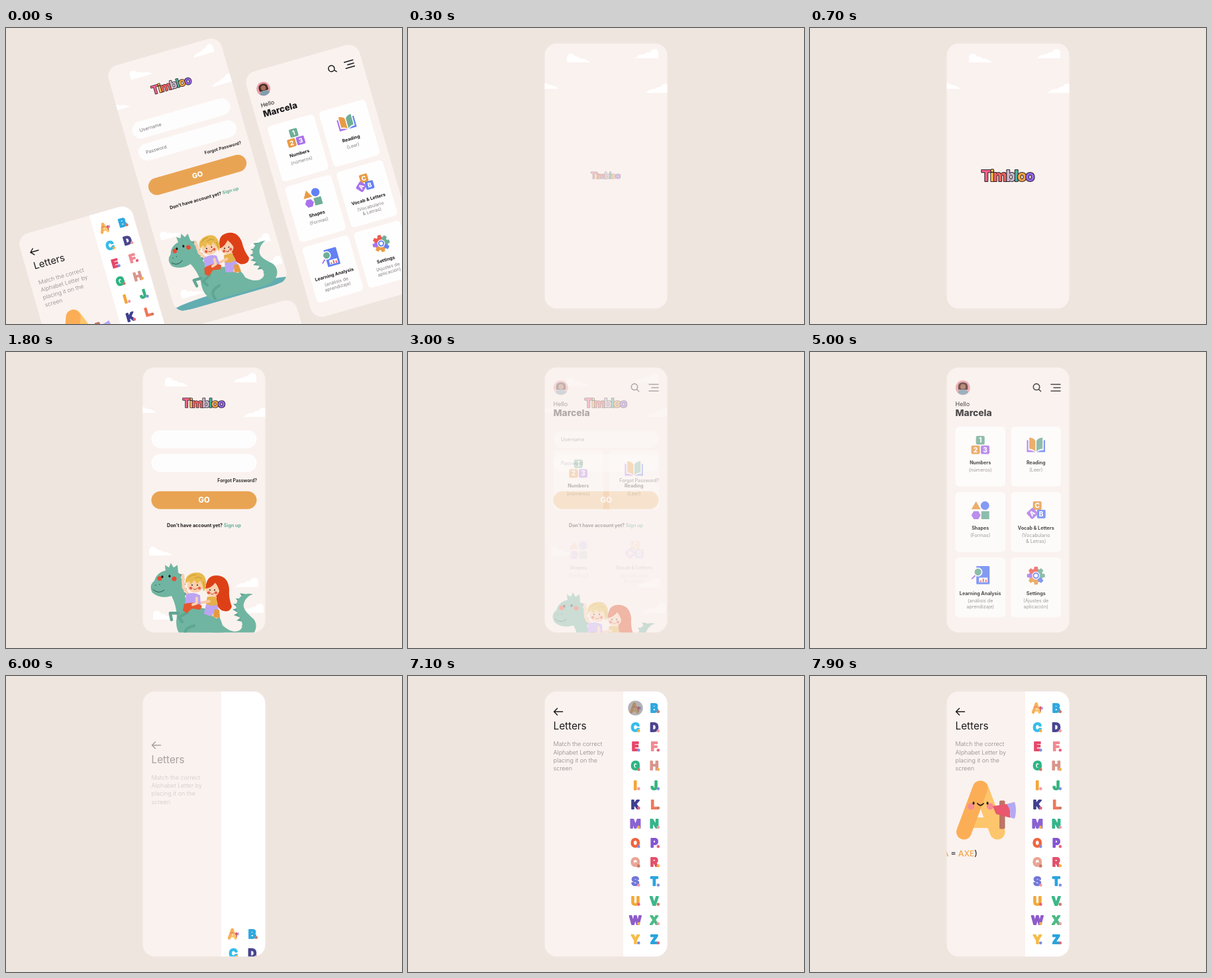
An HTML page for the animation above (8 s loop, 598 by 448 pixels).

```html
<!DOCTYPE html>
<html lang="en">
<head>
<meta charset="utf-8">
<title>Kids learning app</title>
<style>
html, body { margin: 0; width: 100%; height: 100%; overflow: hidden; background: #efe5df; }
svg { display: block; width: 100vw; height: 100vh; font-family: Inter, "Open Sans", sans-serif; fill: #1d1a1c; }
.mid { text-anchor: middle; }
.bold { font-size: 7.15px; font-weight: 700; }
.hint { font-size: 7.3px; fill: #77727a; }
.sub { font-size: 7.2px; fill: #858085; text-anchor: middle; }
.plate { fill: #faf2ef; }
.line { fill: none; stroke-linecap: round; stroke-linejoin: round; }
</style>
</head>
<body>
<svg viewBox="0 0 598 448" preserveAspectRatio="none">
  <defs>
    <rect id="phone" x="206.5" y="23.5" width="185" height="401" rx="18"/>
    <clipPath id="frame"><use href="#phone"/></clipPath>
    <path id="cloud" fill="#fff" d="M0 13V5Q1-1 7 0Q11 1 13 5Q17 3 20 7Q29 7 35 13Z"/>
    <g id="axeLetter" transform="translate(-265.5 -202.5)">
      <g class="line" stroke-width="23">
        <path stroke="#fdc66c" d="M258 170L283 236"/>
        <path stroke="#fdc66c" stroke-width="16" d="M246 222H270"/>
        <path stroke="#fcae56" d="M257 170L232.5 236"/>
      </g>
      <g fill="#f78b95"><circle cx="243" cy="197.5" r="5"/><circle cx="272" cy="197.5" r="5"/></g>
      <ellipse cx="247" cy="192.5" rx="1.5" ry="2.3"/><ellipse cx="268" cy="192.5" rx="1.5" ry="2.3"/>
      <path class="line" stroke="#1d1a1c" stroke-width="1.8" d="M253 193Q257.5 198.5 262 193"/>
      <rect x="286" y="188.5" width="8.5" height="43" rx="2" fill="#bd7465"/>
      <path fill="#e9586e" d="M276 197L302 193V214.5L281 209Z"/>
      <path fill="#b5a8f2" d="M297 194L309 190.5Q313 203 309 216L302 214Q304 203 297 194Z"/>
    </g>
  </defs>
  <rect width="598" height="448" fill="#efe5df"/>
  <use id="base" class="plate" href="#phone"/>
  <use id="below" class="plate" href="#phone"/>

  <g id="login" clip-path="url(#frame)">
    <use class="plate" href="#phone"/>
    <g id="sky">
      <use href="#cloud" x="240" y="39"/><use href="#cloud" x="192" y="79"/>
      <use href="#cloud" transform="translate(378 32) scale(-1 1.05)"/><use href="#cloud" transform="translate(394 84.5) scale(-1 1.05)"/>
    </g>
    <g id="lowClouds">
      <use href="#cloud" x="216" y="295"/><use href="#cloud" x="222" y="392"/>
      <use href="#cloud" transform="translate(381 342) scale(-1 1.05)"/><use href="#cloud" transform="translate(389 381) scale(-1 1.05)"/>
    </g>
    <g id="logo"><text id="logoText" class="mid" y="8.5" font-size="23" font-weight="800" letter-spacing="-2" stroke="#2b2027" stroke-width="2" stroke-linejoin="round" paint-order="stroke"></text></g>
    <g id="form">
      <g fill="#fefdfd"><rect x="219.5" y="118.5" width="159" height="27" rx="13.5"/><rect x="219.5" y="154.5" width="159" height="27" rx="13.5"/></g>
      <text class="bold" x="379" y="196.7" text-anchor="end" style="font-weight:600;font-size:6.9px">Forgot Password?</text>
      <rect x="219.5" y="210.8" width="159" height="27" rx="13.5" fill="#e9a453"/>
      <text class="mid" x="299" y="228.3" font-size="11.3" font-weight="800" fill="#fff">GO</text>
      <text class="bold mid" x="299" y="264.7">Don’t have account yet? <tspan fill="#62b19b">Sign up</tspan></text>
    </g>
    <text id="user" class="hint" x="231" y="134.7">Username</text>
    <text id="pass" class="hint" x="231" y="170.7">Password</text>
    <g id="ride">
      <ellipse cx="298" cy="432" rx="95" ry="8" fill="#62adb2"/>
      <g id="spikes" fill="#5fa693"></g>
      <g fill="#70b5a1">
        <path d="M373 366C355 362 342 378 350 396C354 406 361 412 354 420C346 426 334 422 322 408L306 434H350C378 434 382 414 374 404C366 396 355 388 360 378Q363 370 373 366Z"/>
        <path d="M241 332L240 322L246 326L249 319L253 326L259 322L260 333Z"/>
        <path d="M244 330Q258 325 264 340Q267 358 271 372Q280 386 312 390Q330 402 328 434H268Q254 420 258 400Q257 382 250 369Q232 374 221 364Q215 353 224 346Q228 332 244 330Z"/>
      </g>
      <path class="line" stroke="#5fa693" stroke-width="4.5" d="M260 395L248 395L250 405M274 394L261 401L266 408M272 432Q266 418 284 414"/>
      <g fill="#e94a34"><circle cx="232" cy="342.5" r="3.5"/><circle cx="254" cy="343" r="3.5"/></g>
      <ellipse class="eye" cx="236" cy="340" rx="1.6" ry="2"/><ellipse class="eye" cx="247" cy="339" rx="1.6" ry="2"/>
      <path class="line" stroke="#2f5a50" d="M222 359Q230 367 239 360M226 352v1M232 351v1"/>
      <g id="girl">
        <path fill="#dd4017" d="M302 357Q302 337 319 338Q335 339 337 358Q336 372 341 385Q338 395 326 391Q315 384 318 370Z"/>
        <path fill="#bda4f3" d="M303 378L318 378L323 398Q311 402 299 396Z"/>
        <path fill="#e5b04a" d="M304 370H317L320 382Q311 386 302 381Z"/>
        <path class="line" stroke="#f9c9a6" stroke-width="4" d="M307 377L291 380M313 398L318 401"/>
        <ellipse cx="312" cy="359" rx="10.5" ry="11" fill="#fbd0ae"/>
        <path fill="#dd4017" d="M301 358Q302 342 315 342Q325 346 323 365Q321 355 316 349Q310 357 301 358Z"/>
        <path fill="#e79a3e" d="M315 389L322 390L323 402L313 401Z"/>
      </g>
      <g id="boy">
        <path class="line" stroke="#fbd0ae" stroke-width="4.5" d="M276 368L268 356L267 338"/>
        <path fill="#bda4f3" d="M272 366Q284 362 293 368L294 384H270Z"/>
        <path fill="#e4572e" d="M269 381Q285 376 296 384L293 390L281 388L273 395L267 391Z"/>
        <ellipse cx="286" cy="352" rx="12.5" ry="11.5" fill="#fbd0ae"/>
        <path fill="#e8ba4d" d="M271 350Q270 337 283 334Q300 331 302 347Q303 358 298 362Q297 351 293 346L289 351L284 345L279 352L277 346Z"/>
        <path class="line" stroke="#c8952f" d="M276 341Q281 336 287 337M285 342Q291 338 296 343M298 347Q300 352 299 356"/>
        <path class="line" stroke="#fbd0ae" stroke-width="4" d="M288 372L288 380L282 382"/>
      </g>
      <g fill="#ea5b45"><circle cx="279" cy="357" r="2.2"/><circle cx="292" cy="357" r="2.2"/><circle cx="306" cy="364" r="2.2"/><circle cx="317" cy="364" r="2.2"/></g>
      <g><circle cx="281" cy="352.5" r="1"/><circle cx="289" cy="352.5" r="1"/><circle cx="308" cy="360" r="1"/><circle cx="315" cy="360" r="1"/></g>
      <path class="line" stroke="#b5422f" d="M283 358Q286 361 289 357M309 365Q312 368 314 365"/>
    </g>
  </g>

  <g id="home" clip-path="url(#frame)">
    <use class="plate" href="#phone"/>
    <g id="header">
      <circle cx="230.8" cy="54" r="11" fill="#e9a0a6"/>
      <path fill="#4a2c2a" d="M224 57Q222 46 231 46Q240 46 238 57Z"/>
      <circle cx="231" cy="52.5" r="4" fill="#a96e58"/>
      <path fill="#7f9fb0" d="M223 61.5Q224 57 231 57Q238 57 239 61.5Q231 68 223 61.5Z"/>
      <path class="line" stroke="#1d1a1c" stroke-width="1.6" d="M345.5 56.5L348.5 59.5M364 49H378M368 54H378M364 59H378"/>
      <circle cx="342" cy="52.8" r="4.7" fill="none" stroke="#1d1a1c" stroke-width="1.6"/>
      <text x="219.5" y="81.5" font-size="9">Hello</text>
      <text x="219.5" y="97.3" font-size="13.8" font-weight="800">Marcela</text>
    </g>
    <g id="tiles"></g>
    <circle id="tap" r="11" fill="#8b8688"/>
  </g>

  <g id="letters" clip-path="url(#frame)">
    <use class="plate" href="#phone"/>
    <rect id="panel" x="325" y="23" width="67" height="402" fill="#fff"/>
    <g id="intro">
      <path class="line" stroke="#1d1a1c" stroke-width="1.5" d="M233.5 54H220.5M225.5 49L220.5 54L225.5 59"/>
      <text x="219.5" y="81.3" font-size="15.3">Letters</text>
      <g id="brief" font-size="9" font-weight="300" fill="#8d8688"></g>
    </g>
    <g id="alphabet" class="mid"></g>
    <circle id="press" cx="343.5" cy="48.5" r="11.3" fill="#77737a"/>
    <use id="bigA" href="#axeLetter"/>
    <text id="answer" class="mid" y="272.6" font-size="12" font-weight="600" fill="#444">(<tspan fill="#f0ae5c">A</tspan> = <tspan fill="#f0ae5c">AXE</tspan>)</text>
  </g>
</svg>
<script>
const $ = id => document.getElementById(id);
const [green, orange, purple, blue, red] = ["#6fae97", "#e89b45", "#a873ec", "#6281f5", "#ec5b52"];

const clamp = v => Math.min(1, Math.max(0, v));
const span = (t, a, b) => clamp((t - a) / (b - a));
const easeOut = p => 1 - (1 - p) ** 2;
const easeBoth = p => p < .5 ? 2 * p * p : 1 - 2 * (1 - p) ** 2;
const mix = (a, b, p) => a + (b - a) * p;
const show = (id, alpha) => {
  $(id).setAttribute("opacity", alpha);
  $(id).style.display = alpha > 0 ? "" : "none";
};
const move = (id, x, y, scale = 1) =>
  $(id).setAttribute("transform", `translate(${x} ${y}) scale(${scale})`);

// Logo
const logoColors = ["#f4628a", "#f6c04c", "#ee6260", "#c9b8cd", "#45b59b", "#f2a445", "#9566e6"];
$("logoText").innerHTML = [..."Timbloo"].map((c, i) => `<tspan fill="${logoColors[i]}">${c}</tspan>`).join("");

// Spikes along neck and tail
const spike = (x, y, angle) => `<path transform="translate(${x} ${y}) rotate(${angle})" d="M-4 3L0-6L4 3Z"/>`;
let spikes = "";
for (let i = 0; i < 5; i++) spikes += spike(263 + i * 1.6, 338 + i * 7, 78);
for (let s = 0; s <= 1; s += .16) spikes += spike(348 + 50 * (s - .45) ** 2, 368 + s * 46, -55 - 60 * s);
$("spikes").innerHTML = spikes;

// Home tiles; icons are centred on their own origin
const block = (x, y, color, char, turn = 0) =>
  `<g transform="translate(${x} ${y}) rotate(${turn})"><rect x="-6.5" y="-6.5" width="13" height="13" rx="2" fill="${color}"/>
   <text class="mid" y="3.6" font-size="10" font-weight="800" fill="#fff">${char}</text></g>`;
const page = (flip, color, edge) =>
  `<g transform="scale(${flip} 1)"><path fill="${edge}" d="M11.6-7H13.8V11H1.5Q5 8 11.6 8Z"/>
   <path fill="${color}" d="M.8-6Q3-10.5 10-11V6Q4 6 .8 10.5Z"/></g>`;
const gear = () => {
  const colors = [red, green, green, blue, orange, orange, purple, red];
  const wedge = (c, i) => `<g transform="rotate(${i * 45})" fill="${c}">
    <path d="M0 0L-4.2-9.7A10.6 10.6 0 0 1 4.2-9.7Z"/><rect x="-2.8" y="-13.5" width="5.6" height="6" rx="1"/></g>`;
  return colors.map(wedge).join("") + `<circle r="6" fill="#fff"/><circle r="3.8" fill="none" stroke="${blue}" stroke-width="2"/>`;
};
const tiles = [
  ["Numbers", ["(números)"], block(0, -7, green, 1) + block(-7.2, 7.5, orange, 2) + block(7.3, 7.5, purple, 3)],
  ["Reading", ["(Leer)"], page(-1, orange, purple) + page(1, green, blue)],
  ["Shapes", ["(Formas)"], `<path fill="${orange}" d="M-6.5-13.5L.5-1.5H-13.5Z"/><circle cx="7" cy="-7" r="6.5" fill="${blue}"/>
    <path fill="${purple}" d="M-10 1.5H-3L.5 7.5L-3 13.5H-10L-13.5 7.5Z"/><rect x="1.5" y="1.5" width="12" height="12" fill="${green}"/>`],
  ["Vocab &amp; Letters", ["(Vocabulario", "&amp; Letras)"], block(2, -7, orange, "C") + block(8, 5.7, blue, "B") + block(-5.5, 4.8, purple, "A", -42)],
  ["Learning Analysis", ["(análisis de", "aprendizaje)"], `<rect x="-6" y="-14.5" width="20" height="27.5" rx="1" fill="${blue}"/>
    <path stroke="${purple}" stroke-width="2" stroke-linecap="round" d="M-8 0L-12.5 4.5"/>
    <circle cx="-3.5" cy="-5.5" r="6" fill="${green}" stroke="#fff" stroke-width="1.6"/>
    <rect x="-2" y="3" width="13" height="7" fill="#fff"/><path stroke="${red}" stroke-width="2" d="M.5 9.5V7M4.5 9.5V4.5M8.5 9.5V6"/>`],
  ["Settings", ["(Ajustes de", "aplicación)"], gear()]
];
$("tiles").innerHTML = tiles.map(([name, lines, icon], i) => `<g id="tile${i}">
  <rect width="75.5" height="90.5" rx="6" fill="#fffefe"/>
  <g id="face${i}"><g transform="translate(37.7 27.5)">${icon}</g>
  <text class="bold mid" x="37.7" y="56.5">${name}</text>
  ${lines.map((s, n) => `<text class="sub" x="37.7" y="${68.3 + n * 8.2}">${s}</text>`).join("")}</g></g>`).join("");

// Letters screen
$("brief").innerHTML = ["Match the correct", "Alphabet Letter by", "placing it on the", "screen"]
  .map((s, i) => `<text x="219.5" y="${106.3 + i * 12.2}">${s}</text>`).join("");
const hues = ("f7a53b 2fa8e0 35bdea 4a4590 e5486a f08a92 2fb584 d9958c f4a63a 36b37e 3f3f8f f0785c 8a63d2 " +
  "35b58a f0653f 8455d0 e9a595 e2506a 7277d8 2aa5e0 f2a93b 3cb88a 8e5cc9 4dbb87 f5bd4a 28a4dd").split(" ");
const accents = ["#e8627a", "#f3b04c", "#7f8fe0", "#c77a68", "#f29aa5"];
$("alphabet").innerHTML = hues.map((hue, i) => {
  const at = `translate(${343.3 + i % 2 * 28.5} ${48.5 + (i >> 1) * 29.17})`;
  if (!i) return `<use href="#axeLetter" transform="${at} scale(.19)"/>`;
  const c = "#" + hue;
  return `<g transform="${at}"><text y="6.4" font-size="17.5" font-weight="700" fill="${c}" stroke="${c}" stroke-width="2" stroke-linejoin="round">${String.fromCharCode(65 + i)}</text>
    <circle cx="${5 + i % 2}" cy="5.4" r="2.3" fill="${accents[i * 3 % 5]}"/></g>`;
}).join("");

function drawLogin(t) {
  const leave = span(t, 2600, 3200);
  show("login", 1 - leave);
  const pop = span(t, 100, 700), rise = easeBoth(span(t, 900, 1700));
  move("logo", 298, mix(223, 77, rise), easeOut(pop) * mix(1, .8, rise));
  show("logo", pop);
  const form = span(t, 1000, 1700);
  show("form", form);
  move("form", 0, 35 * (1 - easeOut(form)));
  show("lowClouds", span(t, 1200, 1700));
  show("user", span(t, 1800, 2100));
  show("pass", span(t, 2200, 2400));
  show("ride", t > 1200 ? 1 : 0);
  move("ride", 0, 120 * (1 - easeOut(span(t, 1200, 2100))) - 13 + 130 * leave * leave);
  for (const eye of document.querySelectorAll(".eye")) eye.setAttribute("ry", t === 2300 ? .4 : 2);
}

function drawHome(t) {
  const leave = span(t, 4800, 5700);
  show("home", t > 2700 ? 1 - leave : 0);
  show("header", span(t, 2800, 3400));
  tiles.forEach((_, i) => {
    const row = i >> 1, start = 2800 + row * 150;
    const enter = span(t, start, start + 700);
    show("tile" + i, enter);
    move("tile" + i, 219.5 + i % 2 * 84, 113 + row * 99 + 70 * (1 - easeOut(enter)));
  });
  const push = 1 - .05 * Math.sin(Math.PI * span(t, 4500, 4900));
  move("face3", 37.7 * (1 - push), 45 * (1 - push), push);
  show("tap", .5 * span(t, 3900, 4200) * (1 - span(t, 4600, 4900)));
  move("tap", 341, mix(350, 241, easeBoth(span(t, 3900, 4500))));
}

function drawLetters(t) {
  show("letters", t > 5700 ? 1 : 0);
  show("panel", span(t, 5700, 6000));
  const text = span(t, 5800, 6600);
  show("intro", clamp(text * 1.5));
  move("intro", 0, 58 * (1 - easeBoth(text)));
  const climb = span(t, 5800, 6900);
  move("alphabet", 0, 366 * (1 - easeBoth(climb)));
  $("alphabet").style.filter = climb > 0 && climb < 1 ? "blur(.6px)" : "none";
  show("press", .55 * span(t, 6900, 7100) * (1 - span(t, 7200, 7500)));
  const drag = easeBoth(span(t, 7100, 7500));
  show("bigA", drag > 0 ? 1 : 0);
  move("bigA", mix(343.3, 265.5, drag), mix(48.5, 202.5, drag), mix(.19, 1, drag));
  show("answer", t > 7500 ? 1 : 0);
  $("answer").setAttribute("x", 265 - 90 * (1 - easeBoth(span(t, 7500, 8260))));
}

// Tilted overview: where a point of each screen lands, and its turn
const tilt = (x, y, turn, fromX, fromY) =>
  `translate(${x} ${y}) rotate(${turn}) scale(.963) translate(${-fromX} ${-fromY})`;
const overview = {
  login: tilt(289, 222, -16, 299, 224),
  below: tilt(289, 222, -16, 299, 224) + " translate(0 428)",
  home: tilt(389, 92, -16, 231, 54),
  letters: tilt(43, 338, -16, 227, 54)
};

function draw(t) {
  const cover = t < 100;
  for (const id in overview) $(id).setAttribute("transform", cover ? overview[id] : "");
  for (const plate of document.querySelectorAll(".plate")) plate.style.display = cover ? "" : "none";
  $("base").style.display = cover ? "none" : "";
  drawLogin(cover ? 2500 : t);
  drawHome(cover ? 3850 : t);
  drawLetters(cover ? 8000 : t);
}

const begin = performance.now();
function tick() {
  // Ten pictures a second
  draw(Math.floor((performance.now() - begin) % 8000 / 100) * 100);
  requestAnimationFrame(tick);
}
tick();
</script>
</body>
</html>
```
